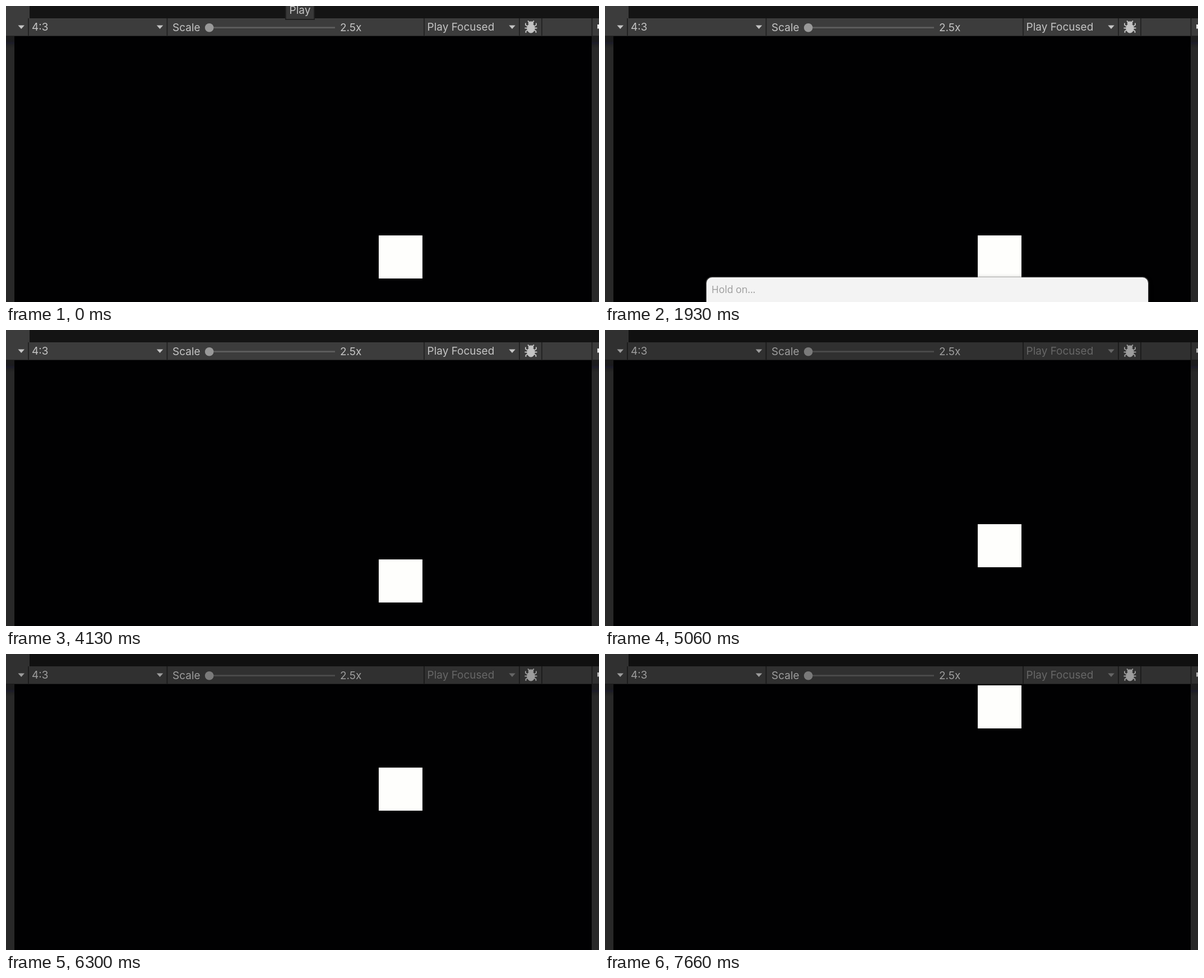
These frames come from a looping animation (1058x529 px, 8 s). An HTML page:

```html
<!DOCTYPE html>
<html lang="en">
<head>
<meta charset="utf-8">
<title>Game view</title>
<style>
  html, body { margin: 0; width: 100%; height: 100%; overflow: hidden; background: #010102; }
  #stage { position: relative; width: 1058px; height: 529px; overflow: hidden; background: #010102; }
  #stage > * { position: absolute; }

  /* one shared 8 s clock, nudged so steps land on their mark */
  .anim { animation: 8s step-end -4ms infinite; }

  .side { top: 54px; height: 475px; background: linear-gradient(#1d1d1d, #1c1c1e 9px, #1d1d2b 12px, #232323 16px, #282828 22px); }
  #toolbar { left: 0; top: 0; animation-name: dim; }
  #toolbar text { font: 19px Inter, Roboto, sans-serif; fill: #c4c4c4; }
  #mode { animation-name: disable; }

  #tip {
    left: 498px; top: -20px; width: 49px; height: 41px; border: 2px solid #202020;
    background: #383838; color: #c4c4c4; animation-name: tip;
    font: 19px/52px Inter, Roboto, sans-serif; text-align: center;
  }

  #block { left: 665px; top: 410px; width: 78px; height: 77px; background: #fefefc; animation-name: rise; }

  #dialog {
    left: 181px; top: 485px; width: 788px; height: 120px; border-radius: 10px;
    background: #f3f3f3; color: #9b9b9b; opacity: 0;
    box-shadow: 0 0 0 1.5px rgba(117, 117, 117, .4), 0 2px 10px rgba(0, 0, 0, .3);
    transform-origin: 292px 25px; animation-name: dialog;
    font: 17.5px/24px "Open Sans", "Noto Sans", sans-serif;
  }
  #dialog span { position: absolute; left: 9px; top: 9px; white-space: nowrap; }
  #reload { animation-name: first; }
  #hold { animation-name: second; }

  @keyframes tip { 0% { visibility: visible } 12.5%, 100% { visibility: hidden } }
  @keyframes first { 0% { visibility: visible } 24.125%, 100% { visibility: hidden } }
  @keyframes second { 0% { visibility: hidden } 24.125%, 100% { visibility: visible } }
  @keyframes dim { 0% { filter: none } 55%, 100% { filter: brightness(.8) } }
  @keyframes disable { 0% { opacity: 1 } 55%, 100% { opacity: .5 } }

  @keyframes dialog {
    0% { opacity: 0; transform: scale(.9) }
    15% { opacity: 0; transform: scale(.9); animation-timing-function: steps(3) }
    16.25% { opacity: .81; transform: scale(.947); animation-timing-function: steps(2) }
    17.04% { opacity: 1; transform: scale(.982); animation-timing-function: steps(3) }
    18.25% { opacity: 1; transform: none }
    47% { opacity: .835; transform: scale(.997); animation-timing-function: steps(4) }
    48.75% { opacity: .1; transform: scale(.947) }
    51.625%, 100% { opacity: 0; transform: scale(.947) }
  }

  @keyframes rise {
    0% { top: 410px }
    55% { top: 407px }
    57.06% { top: 407px; animation-timing-function: steps(14) }
    63.25% { top: 347px; animation-timing-function: steps(10) }
    67.5% { top: 308px; animation-timing-function: steps(25) }
    77.875% { top: 211px; animation-timing-function: steps(25) }
    88.25% { top: 113px; animation-timing-function: steps(16) }
    95.75%, 100% { top: 56px }
  }
</style>
</head>
<body>
<div id="stage">
  <div class="side" style="left:0;width:15px"></div>
  <div class="side" style="left:1045px;width:13px"></div>
  <div id="block" class="anim"></div>

  <svg id="toolbar" class="anim" width="1058" height="54">
    <defs><path id="arrow" d="M0 0h11.5l-5.75 6.5z" fill="#c4c4c4"/></defs>
    <path d="M0 0h1058v22H0z" fill="#141414"/>
    <path d="M0 0h42v22h1016v31H0z" fill="#3c3c3c"/>
    <path d="M0 53h1058v1H0z" fill="#232323"/>
    <path d="M40 22v31M287.5 22v31M746 22v31M916 22v31M956 22v31M1045.5 22v31" stroke="#232323" stroke-width="2"/>

    <use href="#arrow" x="21.5" y="34.5"/>
    <text x="46" y="44">4:3</text>
    <use href="#arrow" x="268.8" y="34.5"/>

    <text x="297" y="44.5">Scale</text>
    <path d="M363 38.7h224" stroke="#5e5e5e" stroke-width="2.8"/>
    <circle cx="362.7" cy="38.7" r="7.8" fill="#999"/>
    <text x="596" y="44.5">2.5x</text>

    <g id="mode" class="anim">
      <text x="751.5" y="44">Play Focused</text>
      <use href="#arrow" x="897.3" y="34.5"/>
    </g>

    <g fill="#c4c4c4" stroke="#c4c4c4">
      <ellipse cx="936.5" cy="39.6" rx="6.8" ry="8.4"/>
      <path d="M932 31.5a4.5 3.6 0 0 1 9 0z"/>
      <path d="M933.5 29l-2.5-2.5M939.5 29l2.5-2.5M930 36l-3-2v-3.500M943 36l3-2v-3.500M930 39.500h-4.500M943 39.500h4.500M930.500 43l-3 2v3M942.500 43l3 2v3" fill="none" stroke-width="1.8"/>
    </g>
    <path d="M1055 33h3v7.500h-3z" fill="#e4e4e4"/>
  </svg>

  <div id="tip" class="anim">Play</div>
  <div id="dialog" class="anim">
    <span id="reload" class="anim">Reloading Domain</span>
    <span id="hold" class="anim">Hold on...</span>
  </div>
</div>
</body>
</html>
```
